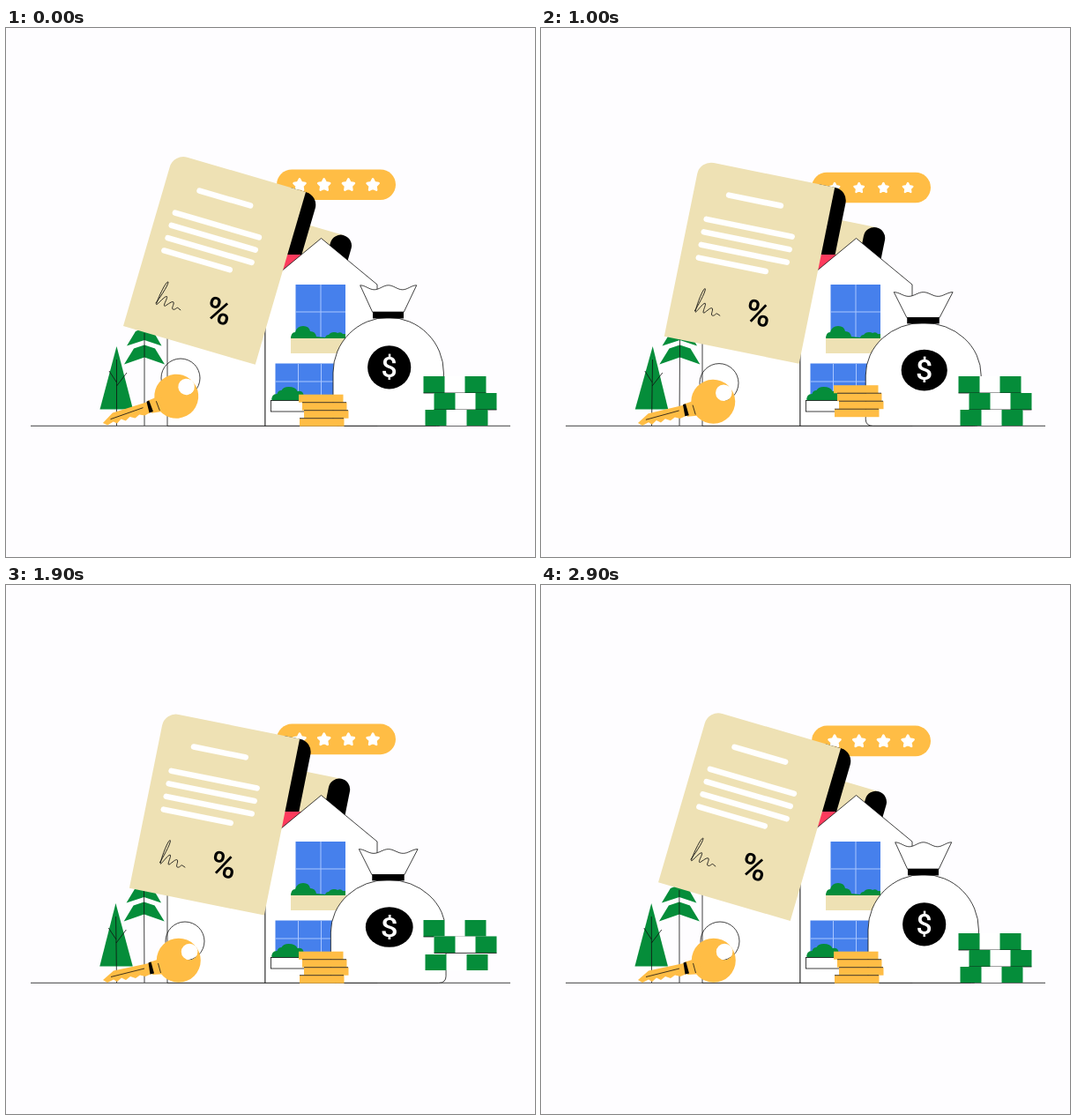
Write an HTML page that moves like this. It is 600 px wide and 600 px high and loops after 3000 ms.

```html
<!DOCTYPE html>
<html lang="en">
<head>
<meta charset="utf-8">
<title>Home loan</title>
<style>
html, body { margin: 0; width: 100%; height: 100%; overflow: hidden; background: #fefdff; }
svg { display: block; width: 100vw; height: 100vh; }
text { font-family: Roboto, Arial, sans-serif; font-weight: 500; text-anchor: middle; }
.ink { fill: none; stroke: #111; stroke-width: .8; }
.box { fill: #fff; stroke: #111; stroke-width: .8; }
.paper { fill: #eee1b4; }
.gold { fill: #ffbd45; }
.leaf { fill: #058d3a; }
.pane { fill: #4680ec; }
.cross { fill: none; stroke: #a9c6ff; stroke-width: 1; }
.rule { fill: none; stroke: #fff; stroke-width: 6.5; stroke-linecap: round; }
</style>
</head>
<body>
<svg viewBox="0 0 600 600">
  <path class="ink" d="M28 451.300H572"/>

  <g id="rating">
    <rect class="gold" x="307" y="-17.3" width="135" height="34.6" rx="17.3"/>
    <g id="stars" fill="#fff" stroke="#fff" stroke-width="2.6" stroke-linejoin="round"/>
  </g>

  <g id="back">
    <path class="paper" d="M80 -67H133V40H80Z"/>
    <path d="M121 40V-54.7a12.25 12.25 0 0 1 24.5 0V40Z"/>
    <path d="M60 -102H78.5a15 15 0 0 1 15 15V40H60Z"/>
  </g>

  <rect x="296" y="257" width="40" height="40" fill="#fd3b5d"/>

  <path class="box" d="M183 451.300V300H294V451.300Z"/>
  <path class="box" d="M294 451.300V291L357.500 238.500L421 291V451.300Z"/>

  <rect class="pane" x="328.500" y="291" width="56.500" height="62"/>
  <path class="cross" d="M357 291V352M328.500 322H385"/>
  <path class="leaf" d="M323 353q0 -8 5 -8q2 -7 9 -7q7 0 8 6q6 0 7 6l10 1q1 -3 4 -3q2 -3 6 -3q3 0 4 1q4 -2 6 1h3v6Z"/>
  <rect class="paper" x="323" y="352" width="68" height="17"/>

  <rect class="pane" x="305.500" y="380.500" width="104" height="43"/>
  <path class="cross" d="M305.500 401H409M331.500 381V423M357.500 381V423"/>
  <path class="leaf" d="M301.500 423q-1 -8 6 -8q1 -4 5 -4q2 -4 8 -4q8 0 10 5q6 -1 7 4q7 0 8 7Z"/>
  <rect class="box" x="300.500" y="422.500" width="114" height="12.500"/>

  <g id="treeA">
    <path class="leaf" d="M125.500 361L144 432.500H106.500Z"/>
    <path class="ink" d="M125.500 376V451M125.500 402L117 389M125.500 406L137 391"/>
  </g>
  <g id="treeB">
    <path id="tier" class="leaf" d="M134 381.500L145 363.500L157 359.500L169 363.500L180 381.500L157 373.500Z"/>
    <path class="leaf" d="M137 360.500L147 344L157 340L167 344L176.500 360.500L157 354Z"/>
    <path class="ink" d="M157 346V451"/>
  </g>

  <g id="sheet">
    <path class="paper" d="M-78 102V-86a16 16 0 0 1 16 -16H78V102Z"/>
    <path class="rule" d="M-38 -69.500H22M-57.500 -37.700H41.500M-57.500 -22.900H41.500M-57.500 -8.100H41.500M-57.500 6.900H20"/>
    <path id="sign" class="ink" pathLength="1" d="M-50 67C-48 62 -42 44 -43 40C-45 37 -49 58 -49 67C-49 72 -43 56 -40 56C-38 57 -42 68 -39 67C-36 64 -33 59 -31 60C-29 62 -32 68 -29 68C-26 68 -26 64 -24 65L-20.500 66.500"/>
    <text x="21.400" y="68.700" font-size="39">%</text>
  </g>

  <circle id="ring" class="ink" r="22"/>
  <g id="key">
    <path class="gold" fill-rule="evenodd" d="M170.800 425.700a25 25 0 1 1 50 0a25 25 0 1 1 -50 0ZM198.800 416a9.300 9.300 0 1 0 18.600 0a9.300 9.300 0 1 0 -18.600 0Z"/>
    <path class="gold" d="M162 428L178 423L183 441L166 442Z"/>
    <path class="gold" d="M162 429L122 437.500L110 448L115 451L122 447.500L126 450L131 445.500L136 448L141 444L147 446L152 442.500L158 444L165 441Z"/>
    <path d="M161.500 428.500L164.500 427.500L168 440.500L163.500 441.500Z"/>
    <path class="ink" d="M119 444.500L157 435M172.500 429L175.500 440"/>
  </g>

  <g id="bag">
    <path class="box" d="M-62.700 -60.300a62.700 62.700 0 0 1 125.400 0V-8q0 8 -8 8H-54.700q-8 0 -8 -8Z"/>
    <path id="neck" class="box"/>
    <rect x="-17.700" y="-129.500" width="35" height="7.600"/>
    <g id="badge">
      <circle r="24.600"/>
      <text y="11.300" font-size="32" fill="#fff">$</text>
    </g>
  </g>

  <g id="coins"></g>
  <g id="bills"></g>
</svg>
<script>
const LOOP = 3000, STEP = 100;
const NS = 'http://www.w3.org/2000/svg';
const $ = id => document.getElementById(id);

function add(parent, tag, attrs = {}) {
  const el = document.createElementNS(NS, tag);
  for (const k in attrs) el.setAttribute(k, attrs[k]);
  return parent.appendChild(el);
}
const move = (el, v) => el.setAttribute('transform', v);
const clamp = v => Math.max(0, Math.min(1, v));
const ease = (t, a, b) => {
  const u = clamp((t - a) / (b - a));
  return u * u * (3 - 2 * u);
};
// Eased value through [time, value] pairs
function track(t, keys) {
  let v = keys[0][1];
  for (let i = 1; i < keys.length; i++)
    v += (keys[i][1] - keys[i - 1][1]) * ease(t, keys[i - 1][0], keys[i][0]);
  return v;
}
// Parabolic arc of height h between two times
function hop(t, a, b, h) {
  const u = (t - a) / (b - a);
  return u > 0 && u < 1 ? 4 * h * u * (1 - u) : 0;
}

const starPath = 'M' + Array.from({ length: 10 }, (_, i) => {
  const r = i % 2 ? 3.5 : 6.8, a = i * Math.PI / 5;
  return (r * Math.sin(a)).toFixed(2) + ' ' + (-r * Math.cos(a)).toFixed(2);
}).join('L') + 'Z';
const stars = [0, 1, 2, 3].map(() => add($('stars'), 'path', { d: starPath }));

const coins = [332, 336, 338, 333].map((x, i) => {
  const g = add($('coins'), 'g'), y = 415.7 + i * 9;
  add(g, 'rect', { class: 'gold', x, y, width: 50.5, height: 9 });
  if (i) add(g, 'path', { class: 'ink', d: `M${x} ${y}h50` });
  return g;
});

const bills = [473.5, 485.5, 475.5].map((x, i) => {
  const g = add($('bills'), 'g'), y = 395 + i * 19;
  const h = i < 2 ? 19 : 18;
  add(g, 'rect', { x, y, width: 71, height: h, fill: '#fff' });
  for (const dx of [0, 47]) add(g, 'rect', { class: 'leaf', x: x + dx, y, width: 24, height: h });
  if (i < 2) add(g, 'path', { class: 'ink', d: `M${x} ${y + h}h71` });
  return g;
});

// Sack opening with a wavy rim; w leans it to the right
function neckPath(w) {
  const a = [-32 + 11.5 * w, -159.5 - 9 * w], b = [32 - .5 * w, -159.5 + 13.5 * w];
  let d = 'M-18 -129';
  for (let i = 0; i <= 32; i++) {
    const u = i / 32, dip = 2.5 * (1 - Math.cos(4 * Math.PI * u));
    d += `L${a[0] + (b[0] - a[0]) * u} ${a[1] + (b[1] - a[1]) * u + dip}`;
  }
  return d + 'L17.500 -129Z';
}

function drawPaper(t, bob) {
  const tilt = 10.8 + 5.5 * (1 - ease(t, 0, 1280) + ease(t, 1640, 2920));
  const place = `translate(236.5 ${262 + bob}) rotate(${tilt})`;
  move($('back'), place);
  move($('sheet'), place);

  // A gap runs along the signature while it is written again
  const wiped = track(t, [[50, 0], [630, 1]]), drawn = track(t, [[280, 0], [950, 1]]);
  const head = Math.min(drawn, wiped), gap = wiped - head;
  $('sign').setAttribute('stroke-dasharray', gap > .001 ? `${head} ${gap} ${1 - wiped} 2` : 'none');
}

function drawRating(t, bob) {
  move($('rating'), `translate(0 ${177.7 + bob})`);
  stars.forEach((s, i) => {
    const pulse = track(t - 300 - i * 100, [[0, 0], [170, .4], [400, -.17], [700, -.17], [1000, 0]]);
    move(s, `translate(${333 + i * 27.7} .5) scale(${1 + pulse})`);
  });
}

function drawKey(t) {
  const late = t < 2000 ? t + LOOP : t;
  const lift = hop(late, 2900, 3360, 7.9) + hop(late, 3750, 4300, 1.3);
  move($('key'), `rotate(${-lift} 110 449)`);
  const lag = track(late, [[2900, 0], [3000, 1], [3150, 1.25], [3600, .35], [4000, .2], [4450, 0]]);
  move($('ring'), `translate(${203 - 5 * lag} ${404 - 7 * lag})`);
}

function drawBag(t) {
  const pose = (squash, stretch, land) =>
    track(t, [[720, 0], [1000, squash], [1500, stretch], [1900, land], [2180, 0]]);
  const sx = 1 + pose(.044, -.1, .042), sy = 1 + pose(-.049, .1, -.049);
  const up = track(t, [[1150, 0], [1500, 4], [1800, 0]]);
  move($('bag'), `translate(433.7 ${451.3 - up}) scale(${sx} ${sy})`);
  move($('badge'), `translate(1 -66.5) scale(${1 + pose(.016, -.11, .05)} ${1 + pose(0, .12, -.025)})`);
  $('neck').setAttribute('d', neckPath(track(t, [[1100, 0], [1500, 1], [1820, 0]])));
}

function drawStacks(t) {
  const up = hop(t, 720, 1300, 10.5) + hop(t, 1300, 1700, 2.3);
  const tilt = track(t, [[1250, 0], [1500, 1.6], [1720, 0]]);
  coins.forEach(c => move(c, `translate(0 ${-up}) rotate(${tilt} 358 434)`));

  [[1700, 17.3], [1725, 17.3], [1755, 15]].forEach(([mid, h], i) =>
    move(bills[i], `translate(0 ${-hop(t, mid - 550, mid + 550, h)})`));
}

function draw(t) {
  const wave = Math.sin(2 * Math.PI * t / LOOP), bob = 3.8 * wave;
  drawPaper(t, bob);
  drawRating(t, bob);
  drawKey(t);
  drawBag(t);
  drawStacks(t);
  const sway = -.9 * wave;
  move($('treeA'), `translate(0 451) skewX(${sway}) translate(0 -451)`);
  move($('treeB'), `translate(0 451) skewX(${sway * .4}) translate(0 -451)`);
}

function tick() {
  const now = (performance.now() + 2) % LOOP;
  draw(Math.floor(now / STEP) * STEP);
  requestAnimationFrame(tick);
}
tick();
</script>
</body>
</html>
```
